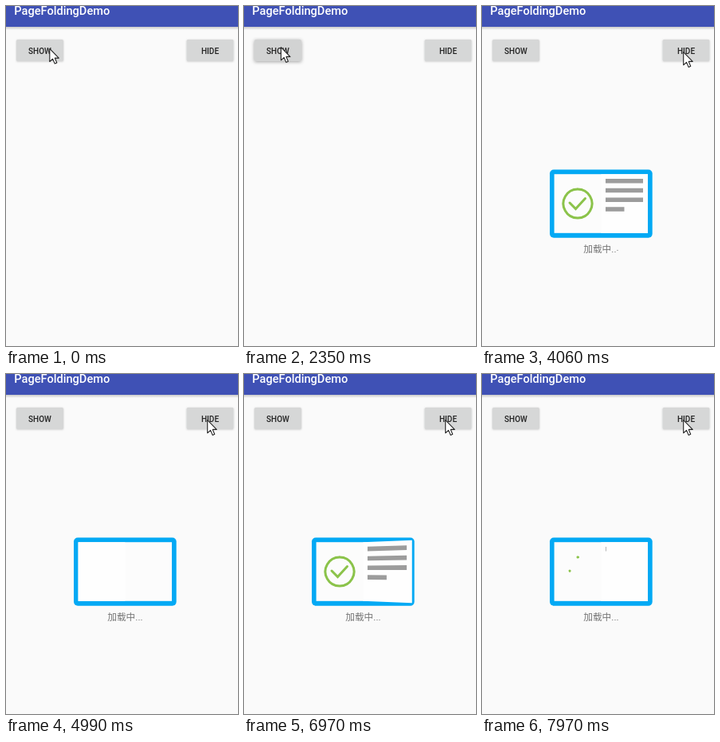
An HTML page that plays this animation: 291 by 425 pixels, repeating every 8 s.

```html
<!DOCTYPE html>
<html lang="en">
<head>
<meta charset="utf-8">
<title>Page loader</title>
<style>
  html, body { margin: 0; width: 100%; height: 100%; overflow: hidden; background: #fafafa; }
  svg { display: block; width: 291px; height: 425px; }
  text { font-family: Roboto, "Noto Sans CJK SC", "Noto Sans CJK", sans-serif; }
  .label { font-size: 10px; font-weight: 500; text-anchor: middle; fill: #212121; }
  .mark { fill: none; stroke: #8bc34a; stroke-width: 3; stroke-linecap: round; }
</style>
</head>
<body>
<svg viewBox="0 0 291 425">
  <defs>
    <linearGradient id="fade" x2="0" y2="1">
      <stop stop-color="#000" stop-opacity=".2"/>
      <stop offset="1" stop-color="#000" stop-opacity="0"/>
    </linearGradient>
    <filter id="rest" x="-20%" y="-30%" width="140%" height="170%">
      <feDropShadow dx="0" dy=".5" stdDeviation=".9" flood-opacity=".2"/>
    </filter>
    <filter id="raised" x="-20%" y="-30%" width="140%" height="170%">
      <feDropShadow dx="0" dy=".9" stdDeviation="2" flood-opacity=".36"/>
    </filter>
  </defs>
  <rect width="291" height="425" fill="#fafafa"/>
  <rect y="26" width="291" height="4" fill="url(#fade)"/>
  <rect width="291" height="26" fill="#3f51b5"/>
  <text x="10.3" y="11.2" font-size="14.6" font-weight="500" fill="#fff">PageFoldingDemo</text>

  <rect id="show" x="13" y="42" width="59" height="27" rx="1.5" fill="#d6d7d7"/>
  <text class="label" x="42.5" y="59.8">SHOW</text>
  <rect x="226.5" y="42" width="59" height="27" rx="1.5" fill="#d6d7d7" filter="url(#rest)"/>
  <text class="label" x="256" y="59.8">HIDE</text>

  <g id="book">
    <text id="caption" x="127.2" font-size="11.7" fill="#757575">加载中...</text>
    <rect x="85" y="204.5" width="128.7" height="85.3" rx="5" fill="#03a9f4"/>
    <rect x="90.6" y="210.2" width="117.4" height="73.6" fill="#fcfcfc"/>
    <g id="marks">
      <path id="ring" class="mark" pathLength="1" d="M120 229a18 18 0 1 1-.01 0"/>
      <path id="tick" class="mark" pathLength="1" d="M110 246l7.5 7.5 12-13"/>
    </g>
    <path id="page" fill="#fefefe"/>
    <path id="lines" fill="#9c9c9c"/>
  </g>

  <path id="cursor" d="M0 0V16.2L3.8 12.8 6.4 18.8 9 17.7 6.5 11.8H11.5Z"
        fill="#fff" stroke="#222" stroke-width="1.1" stroke-linejoin="round"/>
</svg>
<script>
const LOOP = 8000, STEP = 1000 / 15, STEP_ANCHOR = 6970;
const SHOW_AT = 2410, FIRST_DRAW = 2376, CYCLE = 2795;
const DRAW = 850, RING = 780, HOP_AT = 870, HOP_GAP = 115, HOP = 250;
const FLIP_AT = 1664, FLIP = 865;
const SPINE = { x: 149.3, y: 247 }, PAGE_W = 58.7, PAGE_H = 36.8, EYE = 3 * PAGE_W;
const LINE_LENGTHS = [47, 47, 47, 23.5];
const LINE_TOTAL = LINE_LENGTHS.reduce((a, b) => a + b);
const BASELINE = 307.5;

// time, x, y of the pointer tip
const POINTER = [
  [0, 54.8, 53.3], [280, 54.8, 53.3], [340, 66, 71.8], [490, 66, 71.8],
  [1050, 46.4, 51.6], [2480, 46.4, 51.6], [3090, 226, 69], [3270, 240.5, 63.4], [3560, 252.7, 57.6]
];

const $ = id => document.getElementById(id);
const clamp = v => Math.max(0, Math.min(1, v));
const ease = p => (1 - Math.cos(Math.PI * p)) / 2;

function pointerAt(t) {
  const next = POINTER.findIndex(p => p[0] > t);
  if (next < 0) return POINTER[POINTER.length - 1].slice(1);
  const a = POINTER[next - 1], b = POINTER[next];
  const p = ease((t - a[0]) / (b[0] - a[0]));
  return [a[1] + (b[1] - a[1]) * p, a[2] + (b[2] - a[2]) * p];
}

// A rectangle on the page, turned about the spine and seen in perspective
function turned(u0, v0, u1, v1, angle) {
  const point = (u, v) => {
    const s = EYE / (EYE - u * Math.sin(angle));
    return (SPINE.x + u * Math.cos(angle) * s).toFixed(2) + ' ' + (SPINE.y + v * s).toFixed(2);
  };
  return `M${point(u0, v0)}L${point(u1, v0)}L${point(u1, v1)}L${point(u0, v1)}Z`;
}

function linesPath(progress, angle) {
  let left = progress * LINE_TOTAL, d = '';
  LINE_LENGTHS.forEach((length, i) => {
    const shown = Math.min(length, left);
    const v = -31 + i * 11.75;
    if (shown > 0) d += turned(5.7, v, 5.7 + shown, v + 5.6, angle);
    left -= shown;
  });
  return d;
}

function drawBook(t) {
  const tau = ((t - FIRST_DRAW) % CYCLE + CYCLE) % CYCLE;
  const angle = Math.PI * ease(clamp((tau - FLIP_AT) / FLIP));
  const blank = tau >= FLIP_AT + FLIP;

  $('marks').style.display = blank ? 'none' : '';
  const dash = clamp(tau / RING) + ' 2';
  $('ring').setAttribute('stroke-dasharray', dash);
  $('tick').setAttribute('stroke-dasharray', dash);

  $('page').setAttribute('d', turned(0, -PAGE_H, PAGE_W, PAGE_H, angle));
  $('lines').setAttribute('d', angle < Math.PI / 2 ? linesPath(clamp(tau / DRAW), angle) : '');

  const heights = Array.from({ length: 6 }, (_, i) => {
    const p = clamp((tau - HOP_AT - i * HOP_GAP) / HOP);
    return (BASELINE - 3 * Math.sin(Math.PI * p)).toFixed(2);
  });
  $('caption').setAttribute('y', heights.join(' '));
}

function render(t) {
  const stepped = STEP_ANCHOR + Math.floor((t - STEP_ANCHOR) / STEP + 1e-6) * STEP;
  const pressed = t >= 2350 && t < 2560;
  const [x, y] = pointerAt(t);
  $('cursor').setAttribute('transform', `translate(${x.toFixed(2)} ${y.toFixed(2)})`);
  $('show').setAttribute('filter', pressed ? 'url(#raised)' : 'url(#rest)');
  $('show').setAttribute('fill', pressed ? '#d2d3d3' : '#d6d7d7');
  $('book').style.display = t >= SHOW_AT ? '' : 'none';
  if (t >= SHOW_AT) drawBook(stepped);
}

const start = performance.now();
function tick() {
  render((performance.now() - start) % LOOP);
  requestAnimationFrame(tick);
}
tick();
</script>
</body>
</html>
```
